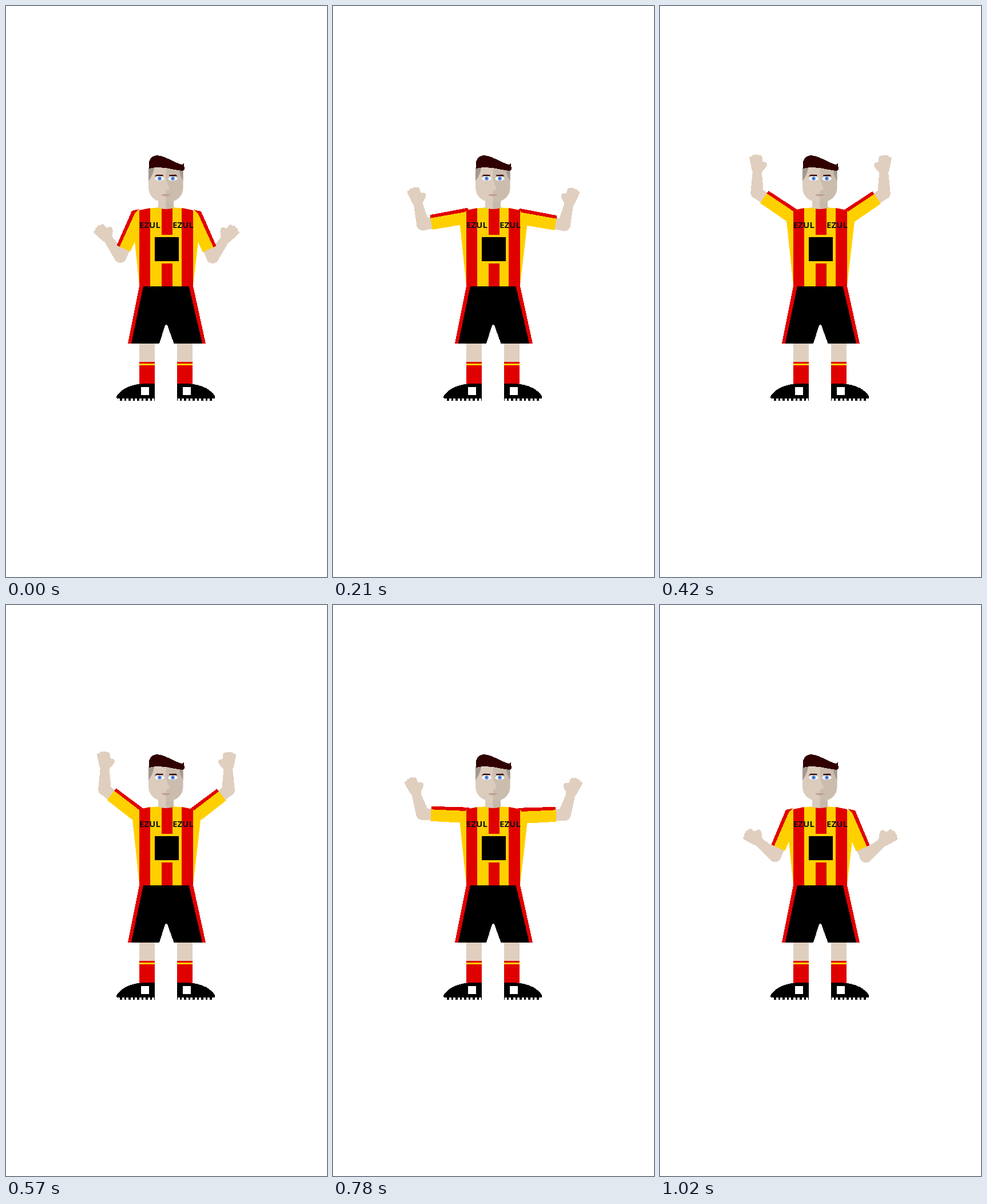
Recreate the animation shown at these times as an HTML page. Size 561 by 998 pixels, loop 1500 ms.

```html
<!DOCTYPE html>
<html lang="en">
<head>
<meta charset="utf-8">
<title>Cheering footballer</title>
<style>
  html, body { margin: 0; width: 100%; height: 100%; overflow: hidden; background: #fff; }
  svg { display: block; width: 100vw; height: 100vh; }
  .skin { fill: #e0cfbf; }
  .red { fill: #e00000; }
  .yellow { fill: #ffd000; }
  .dark { fill: #300000; }
  .crisp { shape-rendering: crispEdges; }
  .sponsor { font: 700 15px "Open Sans", "Noto Sans", sans-serif; fill: #111; }
</style>
</head>
<body>
<svg viewBox="0 0 561 998">
  <defs>
    <clipPath id="shirt">
      <path id="shirtShape" d="M221 376L233 357 250 353.5 266 352H293L310 353.5 327 357 340 378 327 490H233Z"/>
    </clipPath>
    <clipPath id="face">
      <path id="faceShape" d="M249 282H309.5V318A24 24 0 0 1 285.5 342H273A24 24 0 0 1 249 318Z"/>
    </clipPath>
    <g id="leg" class="crisp">
      <path class="skin" d="M233 589h27v34h-27z"/>
      <path class="red" d="M233 622h27v39h-27z"/>
      <path class="yellow" d="M233 625.3h27v2.4h-27z"/>
      <path d="M260 660H240C222 661 207 667 200 674Q193 681 193 684Q193 686 196 686H260Z"/>
      <path d="M199 687.5H260" stroke="#000" stroke-width="4" stroke-dasharray="3.5 4"/>
      <path fill="#fff" d="M236 666h14v14h-14z"/>
    </g>
    <g id="eye">
      <path fill="#fff" d="M-8.5 .5Q-5 -4 0 -4Q6 -4 8.5 1Q4 4 0 4Q-5 4 -8.5 .5Z"/>
      <circle r="3.5" fill="#6495e6"/>
      <circle r="1.4" fill="#2c52a8"/>
    </g>
  </defs>

  <g id="arms" class="crisp"></g>

  <use href="#leg"/>
  <use href="#leg" transform="translate(558.5 0) scale(-1 1)"/>

  <g clip-path="url(#shirt)">
    <use href="#shirtShape" class="yellow"/>
    <path class="red" d="M233 350h19v140h-19zM272 350h19v50h-19zM272 450h19v40h-19zM307 350h20v140h-20z"/>
  </g>
  <path d="M260 404h42v42h-42z"/>
  <text class="sponsor" x="233" y="388">EZUL</text>
  <text class="sponsor" x="291" y="388">EZUL</text>

  <g class="crisp">
    <path class="red" d="M233 489.5H241L220 590H213ZM319 489.5H327L349 590H342Z"/>
    <path d="M240 489.5H319.5L343 590H293.5L282 558Q280 556 278 558L268 590H219Z"/>
  </g>

  <path fill="#d9cbbc" d="M266 336h14v19q-7 0 -14 -2z"/>
  <path fill="#c7b9aa" d="M279.5 336h13.5v17q-7 2 -13.5 2z"/>
  <g clip-path="url(#face)">
    <use href="#faceShape" fill="#dbccbd"/>
    <path fill="#cbbdae" d="M279.5 280H310V343H279.5V323L286 320 279.5 303Z"/>
    <path fill="#a3998f" d="M249 283h10q-2 13 -10 23zM310 283h-8q1 13 8 23z"/>
  </g>
  <use href="#eye" x="268.5" y="301.5"/>
  <use href="#eye" x="291.5" y="301.5"/>
  <path class="dark" d="M259.5 298L263 294.8 274.5 295V297.2L264 297ZM285 295.2L297 294.8 299.5 297.5 285.5 297.3Z"/>
  <path fill="#c29e95" d="M271 330Q275 328 279 329Q284 328 288 330Q279 335 271 330Z"/>
  <path class="dark crisp" d="M250 284C248 272 252 261 264 261C277 261 292 273 306 277Q309 278 310.5 275L311 280Q314 285 310 288C299 288 286 283 272 282.5C262 281.5 256 283 250 284Z"/>
</svg>

<script>
const LOOP = 1500, STEP = 30;

// time, upper arm angle below horizontal, forearm tilt away from the head
const POSES = [
  [0, 65, 35], [210, 9.5, 13], [330, -21, 1], [480, -40, -1],
  [570, -38, -1], [780, -3, 17], [900, 33.5, 34], [1020, 66, 49]
];

const ARM = `
  <path class="skin" d="M50 -10H76V10.5H50Z"/>
  <g class="skin forearm">
    <circle r="11"/>
    <path d="M11 0L8 -36Q10 -40 11 -46L14 -60Q14 -64 9.5 -63Q8.5 -67 4 -65.5
      Q0 -68 -3 -65Q-8 -66 -8.5 -61L-8.5 -56 -11 -53.5Q-15 -55 -17 -50
      Q-17 -45 -9 -38L-8 -34 -11 -8V0Z"/>
  </g>
  <path class="yellow" d="M61 -14V12H5L-12 -4 -5 -14Z"/>
  <path class="red" d="M61 -14L-5 -15.5 -13 -5 -3 -9 61 -8.5Z"/>`;

const arms = document.getElementById("arms");
arms.innerHTML = ["translate(232 369) scale(-1 1)", "translate(329 370)"]
  .map(place => `<g transform="${place}"><g class="arm">${ARM}</g></g>`).join("");
const upperArms = arms.querySelectorAll(".arm");
const forearms = arms.querySelectorAll(".forearm");

function slope(i, part) {
  const before = POSES[Math.max(i - 1, 0)];
  const after = POSES[Math.min(i + 1, POSES.length - 1)];
  return (after[part] - before[part]) / (after[0] - before[0]);
}

// Cubic Hermite curve through the poses
function poseAt(time, part) {
  const last = POSES.length - 1;
  if (time >= POSES[last][0]) return POSES[last][part];
  const i = POSES.findIndex(pose => pose[0] > time) - 1;
  const a = POSES[i], b = POSES[i + 1];
  const span = b[0] - a[0], s = (time - a[0]) / span, r = 1 - s;
  return a[part] * (1 + 2 * s) * r * r + b[part] * s * s * (3 - 2 * s)
    + span * s * r * (slope(i, part) * r - slope(i + 1, part) * s);
}

function draw(now) {
  const time = Math.floor(now % LOOP / STEP) * STEP;
  const shoulder = poseAt(time, 1), tilt = poseAt(time, 2);
  upperArms.forEach(arm => arm.setAttribute("transform", `rotate(${shoulder})`));
  forearms.forEach(arm =>
    arm.setAttribute("transform", `translate(76 0) rotate(${tilt - shoulder})`));
}

let start;
function tick(now) {
  start ??= now;
  draw(now - start);
  requestAnimationFrame(tick);
}
draw(0);
requestAnimationFrame(tick);
</script>
</body>
</html>
```
